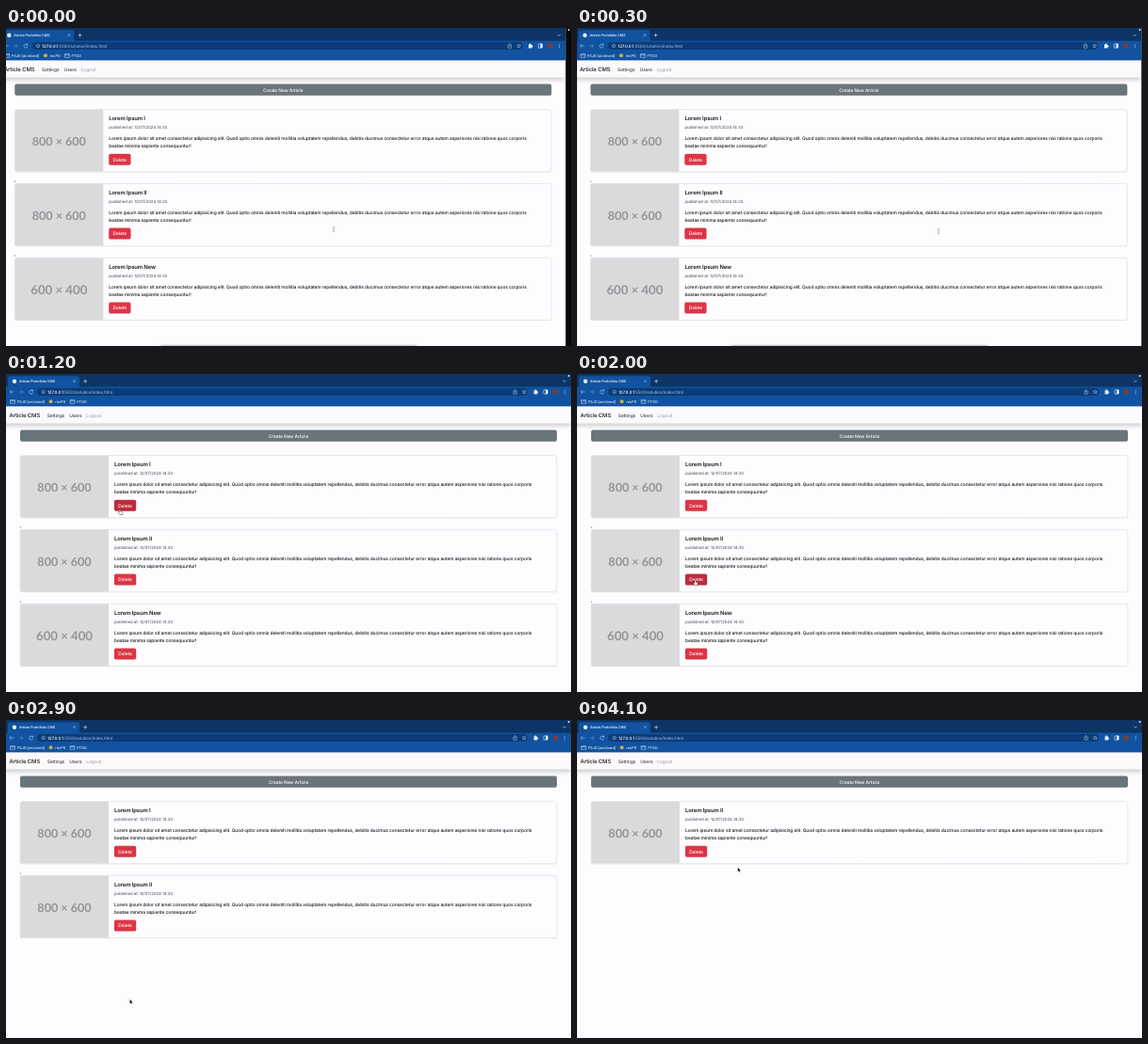
Write an HTML page with a canvas that moves like this. It is 600 px wide and 338 px high and loops after 4300 ms.

```html
<!DOCTYPE html>
<html lang="en">
<head>
<meta charset="utf-8">
<title>Article CMS</title>
<style>
  html, body { margin: 0; width: 100%; height: 100%; overflow: hidden; background: #fefcff; }
  canvas { display: block; width: 600px; height: 338px; }
</style>
</head>
<body>
<canvas id="stage"></canvas>
<script>
const W = 600, H = 338, LOOP = 4300, STEP = 100;
const canvas = document.getElementById('stage');
const ctx = canvas.getContext('2d');
const dpr = window.devicePixelRatio || 1;
canvas.width = Math.round(W * dpr);
canvas.height = Math.round(H * dpr);

const PAGE = '#fefcff', INK = '#15181b', ICON = '#bed1ec';
const TOP = 86.5, PITCH = 78.9, CARD_H = 66.3;
const BUTTON = { x: 114.9, dy: 47.2, w: 23.3, h: 12 };
const BODY = [
  'Lorem ipsum dolor sit amet consectetur adipisicing elit. Quod optio omnis deleniti mollitia voluptatem repellendus, debitis ducimus consectetur error atque autem asperiores nisi ratione quos corporis',
  'beatae minima sapiente consequuntur!'
];
const ARTICLES = [
  { title: 'Lorem Ipsum I', image: '800 × 600', imageFont: 12.6 },
  { title: 'Lorem Ipsum II', image: '800 × 600', imageFont: 12.6 },
  { title: 'Lorem Ipsum New', image: '600 × 400', imageFont: 13.2 }
];

// Pointer moves: from, until, x, y; it rests in between
const MOVES = [
  [0, 300, 384, 216], [300, 600, 145, 293], [600, 800, 69, 215], [800, 1200, 120.5, 144.3],
  [1200, 1600, 134, 218.8], [1700, 2000, 125, 219.3], [2200, 2600, 140, 316],
  [2600, 2800, 131.5, 297], [3000, 3700, 130.5, 138.5], [3800, 4100, 170.8, 156.8]
];

const smooth = k => k * k * (3 - 2 * k);

function pointerAt(t) {
  let x = 348, y = 214;
  for (const [from, until, toX, toY] of MOVES) {
    if (t <= from) break;
    const k = smooth(Math.min(1, (t - from) / (until - from)));
    x += (toX - x) * k;
    y += (toY - y) * k;
  }
  return [x, y];
}

function text(str, x, y, size, color, { weight = 500, align = 'left', font = 'Inter', track = -0.0185 } = {}) {
  ctx.font = `${weight} ${size}px ${font}, sans-serif`;
  ctx.textRendering = 'geometricPrecision';
  ctx.letterSpacing = `${size * track}px`;
  ctx.textAlign = align;
  ctx.fillStyle = color;
  ctx.fillText(str, x, y);
  return ctx.measureText(str).width;
}

function rect(x, y, w, h, color) {
  ctx.fillStyle = color;
  ctx.fillRect(x, y, w, h);
}

function rounded(x, y, w, h, r, fill, stroke, line = 0.6) {
  ctx.beginPath();
  ctx.roundRect(x, y, w, h, r);
  if (fill) { ctx.fillStyle = fill; ctx.fill(); }
  if (stroke) { ctx.strokeStyle = stroke; ctx.lineWidth = line; ctx.stroke(); }
}

function disc(x, y, r, color) {
  ctx.beginPath();
  ctx.arc(x, y, r, 0, Math.PI * 2);
  ctx.fillStyle = color;
  ctx.fill();
}

// Strokes an SVG path placed at x, y, and fills it if asked
function path(d, x, y, stroke, width, fill) {
  const p = new Path2D(d);
  ctx.save();
  ctx.translate(x, y);
  ctx.lineJoin = 'round';
  ctx.strokeStyle = stroke;
  ctx.lineWidth = width;
  ctx.stroke(p);
  if (fill) { ctx.fillStyle = fill; ctx.fill(p); }
  ctx.restore();
}

function shadow(color, blur, dy) {
  ctx.shadowColor = color;
  ctx.shadowBlur = blur * dpr;
  ctx.shadowOffsetY = dy * dpr;
}

function noShadow() { shadow('transparent', 0, 0); }

function bookmark(label, x, color) {
  if (color) disc(x, 29.3, 2, color);
  else path('M-2.4-1.7h4.8v3.7h-4.8zM-2.4-.6h4.8', x, 29.3, ICON, 0.6);
  text(label, x + 4.7, 30.8, 4, '#dbe8f8');
}

function star(x, y, r) {
  ctx.beginPath();
  for (let i = 0; i < 10; i++) {
    const a = i * Math.PI / 5 - Math.PI / 2, d = i % 2 ? r / 2 : r;
    ctx.lineTo(x + d * Math.cos(a), y + d * Math.sin(a));
  }
  ctx.closePath();
  ctx.strokeStyle = ICON;
  ctx.lineWidth = 0.5;
  ctx.stroke();
}

function drawBrowser() {
  rect(-10, 0, W + 10, 14, '#0c3565');
  rect(-10, 13.6, W + 10, 20.8, '#1153a0');
  rounded(2, 2.3, 76, 12, [2.5, 2.5, 0, 0], '#1153a0');
  disc(9, 7.7, 2.2, '#e4ecf7');
  text('Article Portofolio CMS', 14, 9.1, 3.75, '#ffffff');
  path('M-1.2-1.2l2.4 2.4M1.2-1.2l-2.4 2.4', 72.5, 7.6, ICON, 0.6);
  path('M-2 0h4M0-2v4', 84.2, 7.7, ICON, 0.7);
  path('M-1.6-.8L0 .8l1.6-1.6', 593, 7.6, ICON, 0.7);

  rounded(33, 14.9, 521, 8.2, 4.1, '#0b3c78');
  path('M4.6 0H0M2-2L0 0l2 2', 4, 19, '#8fb0dc', 0.7);
  path('M-4.6 0H0M-2-2L0 0l-2 2', 18.2, 19, '#5f8cc6', 0.7);
  path('M1.5-1.3A2 2 0 1 0 2 .6M1.9-2.4v1.5h-1.6', 26.6, 19, ICON, 0.6);
  path('M-1.7 0a1.7 1.7 0 1 0 3.4 0a1.7 1.7 0 1 0-3.4 0M0-.3v1.3', 39.7, 19, ICON, 0.5);
  const host = text('127.0.0.1', 44, 20.7, 4.5, '#ffffff');
  text(':5500/solution/index.html', 44 + host, 20.7, 4.5, '#a9c3e6', { weight: 400 });

  path('M-.9-1h-.8v3.2h3.4v-3.2h-.8M0 .8v-3.2M-.9-1.5L0-2.4l.9.9', 540.6, 19, ICON, 0.5);
  star(550.3, 19.1, 2.1);
  rect(560.6, 17.6, 3.5, 3.8, '#eef4fc');
  disc(562.3, 17.4, 0.9, '#eef4fc');
  disc(564.3, 19.5, 0.9, '#eef4fc');
  rounded(571, 16.9, 4.2, 4.2, 0.4, null, '#eef4fc', 0.6);
  rect(573.2, 16.9, 2, 4.2, '#eef4fc');
  disc(583.2, 19, 2.7, '#7d3a3c');
  for (const dy of [-1.8, 0, 1.8]) disc(593.2, 19 + dy, 0.5, ICON);

  bookmark('FSJS [archived]', 7);
  bookmark('recPS', 47.6, '#c9b04e');
  bookmark('FTGO', 70.5);
}

function drawNav() {
  shadow('rgba(0,0,0,.2)', 5, 2.4);
  rect(-10, 34, W + 10, 18.5, '#fbf9fc');
  noShadow();
  text('Article CMS', 3.6, 46, 5.95, INK);
  text('Settings', 43.7, 45.8, 4.9, '#3f4347');
  text('Users', 67.3, 45.8, 4.9, '#3f4347');
  text('Logout', 85.3, 45.8, 4.9, '#a9a9ad');
}

const buttonTop = slot => TOP + slot * PITCH + BUTTON.dy;

function drawCard(article, slot, hover) {
  const y = TOP + slot * PITCH;
  if (slot) text(',', 14.8, y - 2.6, 4.9, INK);
  shadow('rgba(0,0,0,.1)', 1.2, 0.4);
  rounded(15.2, y, 569.6, CARD_H, 2, PAGE);
  noShadow();
  rounded(15.2, y, 569.6, CARD_H, 2, null, '#dddce0', 0.6);
  rounded(15.2, y + 0.2, 93.8, CARD_H - 0.4, [2, 0, 0, 2], '#dad9db');
  text(article.image, 62, y + 38.2, article.imageFont, '#959497', { weight: 700, align: 'center', font: 'Lato', track: 0 });
  text(article.title, 115, y + 11.5, 5.9, INK, { weight: 600 });
  text('published at: 12/07/2024 14:33', 115, y + 20.6, 4.37, '#44484d', { weight: 400, track: -0.0132 });
  BODY.forEach((line, i) => text(line, 115, y + 32.8 + i * 7.5, 4.88, INK));
  rounded(BUTTON.x, buttonTop(slot), BUTTON.w, BUTTON.h, 1.9, hover ? '#bb2d3b' : '#dc3545');
  text('Delete', BUTTON.x + BUTTON.w / 2, buttonTop(slot) + 7.8, 4.9, '#ffffff', { align: 'center' });
}

function drawPointer(kind, x, y) {
  if (kind === 'beam') path('M0-1.6v3.2M-.8-2.3h1.6M-.8 2.3h1.6', x, y, '#77777b', 0.7);
  else if (kind === 'hand') path('M0 0h.8l.1 2 1.7.3.5.7-.4 2.2h-2.4l-1.7-2.1.4-.4 1 .5z', x, y, '#1c1c1c', 0.9, '#ffffff');
  else path('M0 0v4.4l1-.9.7 1.5.7-.3-.7-1.5 1.3-.1z', x, y, '#ffffff', 0.8, '#111111');
}

// Soft edge of a panel sinking below the stage
function drawDock(t) {
  const sink = Math.max(0, t - 300) / 50;
  if (sink >= 4) return;
  shadow('rgba(0,0,0,.55)', 3, 0);
  rounded(163, H + 0.1 + sink, 274, 10, 3, '#8b8b8f');
  noShadow();
}

function draw(now) {
  const t = Math.floor((now % LOOP) / STEP) * STEP;
  const pan = t < 600 ? -5.7 * Math.pow(1 - t / 600, 3.2) : 0;
  const shown = t < 2900 ? ARTICLES : t < 3900 ? ARTICLES.slice(0, 2) : ARTICLES.slice(1, 2);
  const [px, py] = pointerAt(t);
  const over = shown.findIndex((_, i) => {
    const dx = px - BUTTON.x, dy = py - buttonTop(i);
    return dx > 0 && dx < BUTTON.w && dy > 0 && dy < BUTTON.h;
  });

  ctx.setTransform(dpr, 0, 0, dpr, 0, 0);
  rect(0, 0, W, H, PAGE);
  ctx.save();
  ctx.translate(pan, 0);
  drawNav();
  drawBrowser();
  rounded(15, 59.6, 570, 12.1, 1.9, '#69757b');
  text('Create New Article', 300, 67.5, 4.9, '#ffffff', { align: 'center' });
  shown.forEach((article, i) => drawCard(article, i, i === over && t < 2900));
  ctx.restore();
  if (pan) rect(W + pan, 0, -pan, H, '#08080a');
  disc(597.6, 2, 1, '#dfe3ea');
  drawDock(t);
  drawPointer(t < 600 ? 'beam' : over >= 0 ? 'hand' : 'arrow', px, py);
}

const start = performance.now();
function tick() {
  draw(performance.now() - start);
  requestAnimationFrame(tick);
}
draw(0);
requestAnimationFrame(tick);
</script>
</body>
</html>
```
